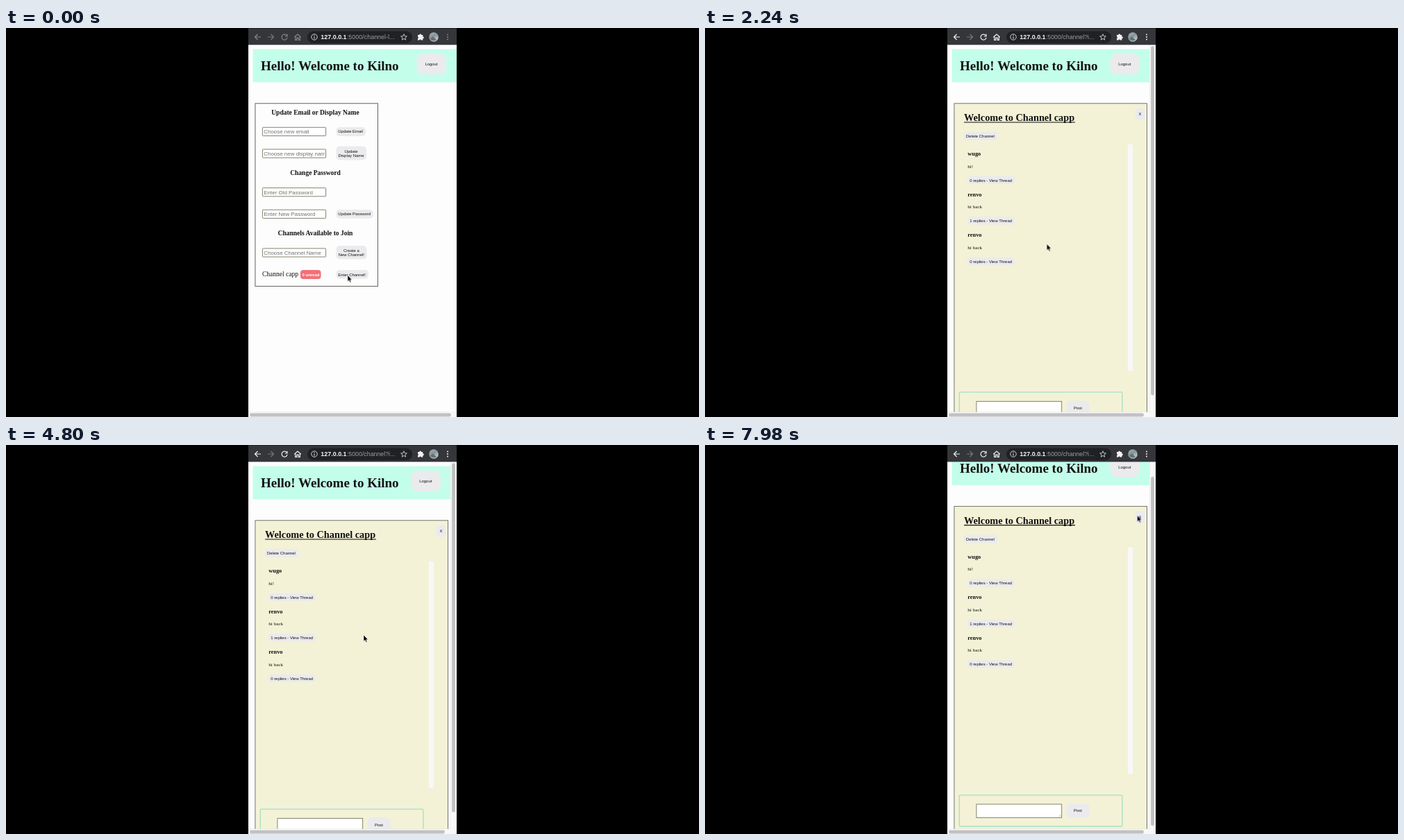
Recreate the animation shown at these times as an HTML page. Size 998 px wide and 561 px high, loop 8000 ms.

```html
<!DOCTYPE html>
<html lang="en">
<head>
<meta charset="utf-8">
<title>Channel demo</title>
<style>
html, body { margin: 0; width: 100%; height: 100%; overflow: hidden; background: #000; }
svg { display: block; width: 100%; height: 100%; }
text { font-family: "Liberation Sans", Arial, sans-serif; font-size: 5.95px; fill: #111; }
.serif { font-family: "Liberation Serif", Times, serif; font-size: 9.5px; }
.bold { font-weight: bold; }
.mid { text-anchor: middle; }
.hint { font-size: 7.95px; fill: #707070; }
.url { font-size: 8.95px; fill: #9a9da1; }
.name { font-size: 8.3px; }
.msg { font-size: 7.15px; }
.btn { fill: #ebebed; }
.field { fill: #fff; stroke: #77775f; stroke-width: .9; }
.thumb { fill: #c1c1c3; }
.line { fill: none; stroke: currentColor; stroke-width: 1.2; }

/* Hard state changes */
.list, .blur, .url-list { animation: 8s step-end infinite; }
.room, .focus, .url-room, .feed { animation: 8s step-end infinite; }
.list { animation-name: leave-list; }
.room { animation-name: enter-room; }
.blur { animation-name: lose-blur; }
.focus { animation-name: gain-focus; }
.url-list { animation-name: leave-url; }
.url-room, .feed { animation-name: loaded; }
@keyframes leave-list { 0% { visibility: visible } 15%, 100% { visibility: hidden } }
@keyframes enter-room { 0% { visibility: hidden } 15%, 100% { visibility: visible } }
@keyframes lose-blur { 0% { visibility: visible } 8.75%, 100% { visibility: hidden } }
@keyframes gain-focus { 0% { visibility: hidden } 8.75%, 100% { visibility: visible } }
@keyframes leave-url { 0% { visibility: visible } 21.25%, 100% { visibility: hidden } }
@keyframes loaded { 0% { visibility: hidden } 21.25%, 100% { visibility: visible } }

/* Scrolling and pointer */
.page { animation: scroll 8s infinite; }
.bar { animation: bar 8s infinite; }
.pointer { animation: point 8s ease-in-out infinite; }
@keyframes scroll {
  0%, 65% { transform: translateY(0) }
  69%, 98.6% { transform: translateY(-22.7px) }
  99.75%, 100% { transform: translateY(-20.4px) }
}
@keyframes bar {
  0%, 65% { transform: translateY(0) }
  69%, 98.6% { transform: translateY(21.7px) }
  99.75%, 100% { transform: translateY(19.5px) }
}
@keyframes point {
  0%, 8% { transform: translate(492px, 356.5px) }
  16%, 24% { transform: translate(492px, 354.5px) }
  36%, 42% { transform: translate(493px, 170px) }
  54%, 61% { transform: translate(515px, 274px) }
  70%, 74% { transform: translate(473px, 433.5px) }
  82.5% { transform: translate(608px, 110px); animation-timing-function: ease-out }
  86%, 94% { transform: translate(631px, 43px) }
  98.5%, 100% { transform: translate(622.5px, 101.5px) }
}
</style>
</head>
<body>
<svg viewBox="0 0 998 561">
  <defs>
    <clipPath id="view"><rect x="349" y="24" width="300" height="530"/></clipPath>
    <clipPath id="hintClip"><rect x="369" y="170" width="90" height="20"/></clipPath>
    <linearGradient id="photo" x2=".6" y2="1">
      <stop offset="0" stop-color="#a9b8bd"/><stop offset=".5" stop-color="#86949a"/><stop offset="1" stop-color="#c9d0d0"/>
    </linearGradient>
    <rect id="input" class="field" x="369.4" width="91.2" height="12.2" rx=".8"/>
    <g id="nav" class="line">
      <path d="M367 13H358.5M362.5 9L358.5 13L362.5 17"/>
      <path d="M404.2 10.6A4 4 0 1 0 405 14M405 8.8V12H401.8"/>
      <path d="M415.3 13.2L420 9L424.7 13.2M416.7 12.5V17.3H418.8V14.2H421.2V17.3H423.3V12.5"/>
    </g>
    <g id="dots" fill="currentColor"><circle cx="636" cy="9.5" r="1"/><circle cx="636" cy="13" r="1"/><circle cx="636" cy="16.5" r="1"/></g>
  </defs>

  <rect width="998" height="561"/>
  <rect x="349" width="300" height="561" fill="#fdfdfd"/>

  <g clip-path="url(#view)">
    <g class="page">
      <rect x="355.5" y="30.5" width="284.5" height="47.8" fill="#c3feea"/>
      <text class="serif bold" x="367" y="60.5" style="font-size:19px">Hello! Welcome to Kilno</text>

      <g class="list">
        <rect x="639" y="30.5" width="10" height="47.8" fill="#c3feea"/>
        <rect class="btn" x="591.5" y="37" width="42.5" height="30" rx="9"/>
        <text class="mid" x="612.5" y="54">Logout</text>
        <rect x="358.9" y="108.8" width="176.6" height="263.6" fill="none" stroke="#50504a" stroke-width=".9"/>
        <g class="mid">
          <text class="serif bold" x="445.5" y="124.5">Update Email or Display Name</text>
          <text class="serif bold" x="445.5" y="212">Change Password</text>
          <text class="serif bold" x="445.5" y="299.2">Channels Available to Join</text>
        </g>
        <use href="#input" y="143.3"/><use href="#input" y="174.9"/><use href="#input" y="230.6"/>
        <use href="#input" y="262.2"/><use href="#input" y="317.9"/>
        <text class="hint" x="371.3" y="152.2">Choose new email</text>
        <text class="hint" x="371.3" y="183.8" clip-path="url(#hintClip)">Choose new display name</text>
        <text class="hint" x="371.3" y="239.5">Enter Old Password</text>
        <text class="hint" x="371.3" y="271.1">Enter New Password</text>
        <text class="hint" x="371.3" y="326.8">Choose Channel Name</text>
        <g class="btn">
          <rect x="475.5" y="143" width="42.5" height="13" rx="5"/>
          <rect x="475.5" y="170.5" width="43.5" height="20" rx="5"/>
          <rect x="475.5" y="262" width="53.5" height="12.5" rx="5"/>
          <rect x="475.5" y="314" width="44" height="19.5" rx="5"/>
          <rect x="475.5" y="349" width="46.5" height="12.8" rx="5"/>
        </g>
        <text x="478.3" y="151.4">Update Email</text>
        <g class="mid">
          <text x="497" y="179.7">Update</text><text x="497" y="186.2">Display Name</text>
          <text x="497.3" y="322.7">Create a</text><text x="497.3" y="329.3">New Channel!</text>
        </g>
        <text x="478.3" y="270.3">Update Password</text>
        <text x="478.3" y="357.7">Enter Channel!</text>
        <text class="serif" x="369" y="358">Channel capp</text>
        <rect x="424" y="349" width="29.5" height="13" rx="4" fill="#f37078"/>
        <text class="bold" x="426.6" y="357.6" style="fill:#fff">0 unread</text>
      </g>

      <g class="room">
        <rect class="btn" x="583.5" y="37" width="42.5" height="30" rx="9"/>
        <text class="mid" x="604.3" y="54">Logout</text>
        <rect x="358.9" y="108.8" width="277.6" height="466.7" fill="#f3f2d7" stroke="#66665c" stroke-width=".9"/>
        <text class="serif bold" x="373" y="134" style="font-size:14.29px">Welcome to Channel capp</text>
        <path d="M373 136H533" stroke="#111" stroke-width="1.1"/>
        <rect class="btn" x="619.5" y="115.5" width="14.5" height="17.5" rx="5"/>
        <text class="mid" x="626.6" y="126.4">X</text>
        <rect class="btn" x="373" y="150" width="48" height="12" rx="3"/>
        <text x="376" y="158.1">Delete Channel</text>
        <rect x="609" y="168" width="7" height="326.5" fill="#f8f8f8"/>
        <rect x="366.3" y="525.2" width="234.6" height="45.2" rx="1.5" fill="none" stroke="#a5dfc2" stroke-width="1.3"/>
        <rect class="field" x="390.9" y="538.4" width="122.8" height="19.4"/>
        <path d="M509.3 556.6L512.6 553.3M511.3 556.6L512.6 555.3" stroke="#888" stroke-width=".5"/>
        <rect class="btn" x="520.5" y="537.5" width="33.5" height="20.5" rx="6"/>
        <text class="mid" x="537" y="549.7">Post</text>
      </g>

      <g class="feed">
        <g>
          <text class="serif bold name" x="378.3" y="184.3">wugo</text>
          <text class="serif msg" x="378.3" y="201.6">hi!</text>
          <rect class="btn" x="378.3" y="213.5" width="67.5" height="11.5" rx="3"/>
          <text x="381.2" y="221.5">0 replies - View Thread</text>
        </g>
        <g transform="translate(0 58.6)">
          <text class="serif bold name" x="378.3" y="184.3">renvo</text>
          <text class="serif msg" x="378.3" y="201.6">hi back</text>
          <rect class="btn" x="378.3" y="213.5" width="67.5" height="11.5" rx="3"/>
          <text x="381.2" y="221.5">1 replies - View Thread</text>
        </g>
        <g transform="translate(0 117.2)">
          <text class="serif bold name" x="378.3" y="184.3">renvo</text>
          <text class="serif msg" x="378.3" y="201.6">hi back</text>
          <rect class="btn" x="378.3" y="213.5" width="67.5" height="11.5" rx="3"/>
          <text x="381.2" y="221.5">0 replies - View Thread</text>
        </g>
      </g>
    </g>
  </g>

  <!-- Scrollbars -->
  <path d="M349 553.9H649" stroke="#e4e4e4" stroke-width=".7"/>
  <rect x="349" y="554.2" width="300" height="6.8" fill="#f8f8f8"/>
  <rect class="thumb list" x="351" y="555.6" width="290" height="4.8" rx="2.4"/>
  <g class="room">
    <rect x="640.5" y="24" width="8.5" height="530" fill="#f8f8f8"/>
    <path d="M640.5 24V554" stroke="#e6e6e6" stroke-width=".6"/>
    <rect class="thumb" x="351" y="555.6" width="281" height="4.8" rx="2.4"/>
    <rect class="thumb bar" x="642.1" y="26.3" width="4.9" height="503.5" rx="2.45"/>
  </g>

  <!-- Toolbar -->
  <rect x="349" width="300" height="24.3" fill="#35363a"/>
  <rect x="349" width="300" height="1" fill="#222326"/>
  <rect x="434" y="4.5" width="151" height="17.5" rx="8.75" fill="#202124"/>
  <g class="blur" color="#85878a"><use href="#nav"/><use href="#dots"/></g>
  <g class="focus" color="#f1f2f3"><use href="#nav"/><use href="#dots"/></g>
  <path class="line" color="#77797d" d="M377 13H385.5M381.5 9L385.5 13L381.5 17"/>
  <g color="#d0d2d5">
    <circle class="line" cx="444" cy="13" r="4.2" style="stroke-width:1"/>
    <path class="line" d="M444 12.4V15.4M444 10.3V11.4"/>
    <path class="line" style="stroke-width:.9" d="M573 8.7L574.2 11.7L577.4 11.9L574.9 14L575.7 17.1L573 15.4L570.3 17.1L571.1 14L568.6 11.9L571.8 11.7Z"/>
  </g>
  <path fill="#f1f2f3" d="M593 10H595.2A1.5 1.5 0 0 1 598.2 10H600.3V12.2A1.5 1.5 0 0 1 600.3 15.2V17.5H597.9A1.3 1.3 0 0 0 595.4 17.5H593V15A1.3 1.3 0 0 0 593 12.5Z"/>
  <circle cx="616" cy="13" r="6.8" fill="url(#photo)"/>
  <path d="M611 16Q615 10 617 14T621.5 16A6.8 6.8 0 0 1 611 16Z" fill="#647276"/>
  <text class="url bold" x="453.3" y="16.3" style="fill:#f3f4f5">127.0.0.1</text>
  <text class="url url-list" x="490.9" y="16.3">:5000/channel-l...</text>
  <text class="url url-room" x="490.9" y="16.3" style="font-size:8.8px">:5000/channel?i...</text>

  <path class="pointer" d="M0 0V9.2L2.1 7.3L3.6 10.6L5.1 9.9L3.7 6.7H6.4Z" fill="#000" stroke="#fff" stroke-width=".6"/>
</svg>
</body>
</html>
```
